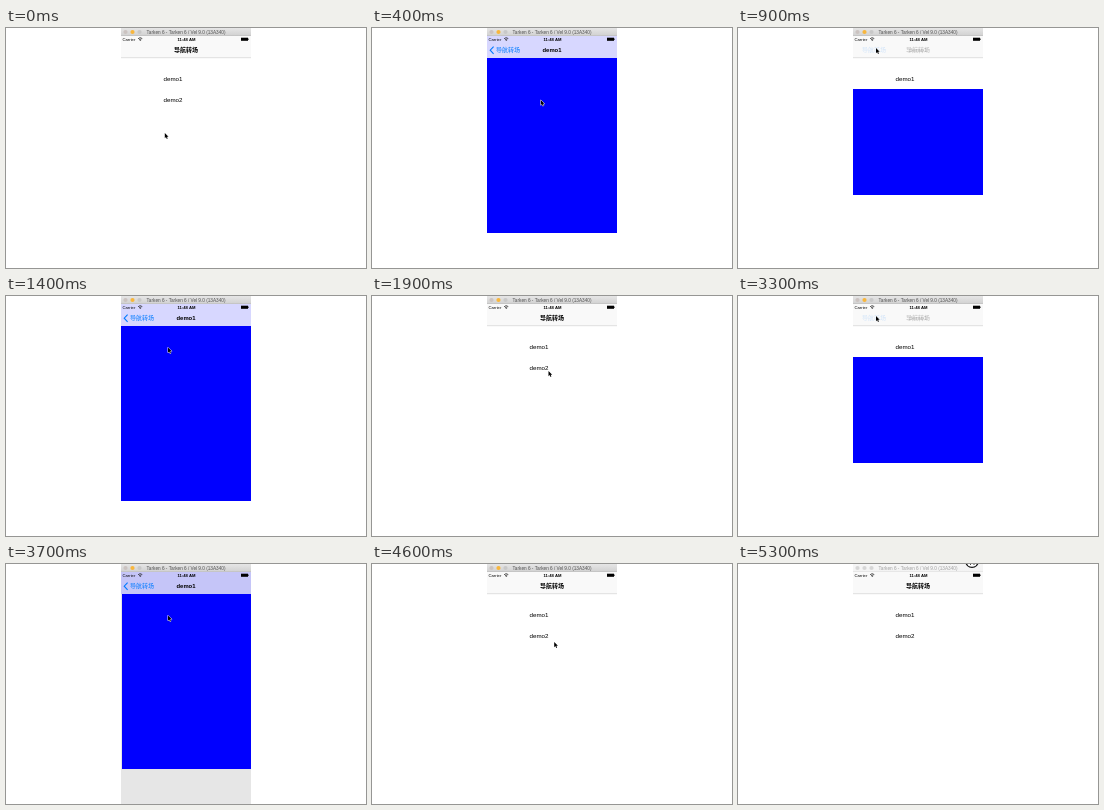
These frames come from a looping animation (360 by 240 pixels, 5.4 s). An HTML page with a canvas:

```html
<!DOCTYPE html>
<html lang="zh">
<head>
<meta charset="utf-8">
<title>导航转场</title>
<style>
  html, body { margin: 0; width: 100%; height: 100%; overflow: hidden; background: #fff; }
  canvas { display: block; }
</style>
</head>
<body>
<canvas id="stage" width="360" height="240"></canvas>
<script>
const ctx = document.getElementById('stage').getContext('2d');
const LOOP = 5400, STEP = 100, CYCLE = 24;
const LEFT = 115, WIDTH = 130, TOP = 8, NAV_BOTTOM = 30, SHEET_BOTTOM = 205, MIDDLE = 123.5;
const SANS = '"Liberation Sans", Arial, sans-serif';
const CJK = '"Noto Sans CJK SC", "Noto Sans CJK", sans-serif';
const HOME = '导航转场';

// Pointer stops: [step, x, y]
const visit = [
  [0, 158.8, 105], [2, 168.8, 72], [5, 168.8, 72], [8, 138, 20], [10, 138, 20],
  [12, 162, 51.5], [14, 162, 51.5], [17, 138, 20], [18, 138, 20],
  [19, 176.5, 75], [22, 182.2, 78], [24, 158.8, 105]
];
const leave = [[46, 182.2, 78], [48, 205, 42], [52, 234, 3]];

function pointerAt(step) {
  const path = step < 46 ? visit : leave;
  const at = step < 46 ? step % CYCLE : step;
  const i = path.findIndex((stop, n) => n && at <= stop[0]);
  const [a, b] = [path[i - 1], path[i]];
  const k = (at - a[0]) / (b[0] - a[0]);
  return [a[1] + (b[1] - a[1]) * k, a[2] + (b[2] - a[2]) * k];
}

// Page pose: pushed in from the right, open, or squashed towards the middle
function poseAt(step) {
  const at = step < 2 * CYCLE ? step % CYCLE : 0;
  if (at === 3 || at === 13) return { open: true, shift: 1 };
  if (at === 9) return { scale: 0.541 };
  if (at === 18) return { scale: 0.705 };
  return { open: (at > 3 && at < 9) || (at > 13 && at < 18), shift: 0 };
}

function rect(x, y, w, h, fill) {
  ctx.fillStyle = fill;
  ctx.fillRect(x, y, w, h);
}

function disc(x, y, r, fill) {
  ctx.fillStyle = fill;
  ctx.beginPath();
  ctx.arc(x, y, r, 0, 7);
  ctx.fill();
}

function line(points, color, width) {
  ctx.strokeStyle = color;
  ctx.lineWidth = width;
  ctx.beginPath();
  points.forEach(p => ctx.lineTo(...p));
  ctx.stroke();
}

function text(str, x, y, font, fill = '#000', align = 'center', alpha = 1) {
  ctx.globalAlpha = alpha;
  ctx.font = font;
  ctx.textAlign = align;
  ctx.fillStyle = fill;
  ctx.fillText(str, x, y);
  ctx.globalAlpha = 1;
}

function drawTitleBar(active) {
  const shade = ctx.createLinearGradient(0, 0, 0, TOP);
  shade.addColorStop(0, active ? '#e6e6e6' : '#f6f6f6');
  shade.addColorStop(1, active ? '#d0d0d0' : '#f3f3f3');
  rect(LEFT, 0, WIDTH, TOP, shade);
  rect(LEFT, TOP - 0.5, WIDTH, 0.5, active ? '#b8b8b8' : '#dadada');
  const lights = active ? ['#cbc3c1', '#f8b63c', '#c8c8c8'] : ['#d6d6d6', '#d6d6d6', '#d6d6d6'];
  lights.forEach((color, i) => disc(119.5 + i * 7, 4, 2.1, color));
  text('Tarken 6 - Tarken 6 / Vel 9.0 (13A340)', 180, 5.7, '4.7px ' + SANS, active ? '#505050' : '#a0a0a0');
}

function drawStatus() {
  text('Carrier', 116.5, 12.9, '4.2px ' + SANS, '#000', 'left');
  text('11:48 AM', 180.5, 12.9, 'bold 4.2px ' + SANS);
  ctx.strokeStyle = '#111';
  ctx.lineWidth = 0.7;
  for (const r of [1.5, 2.9]) {
    ctx.beginPath();
    ctx.arc(134.2, 12.7, r, -2.4, -0.74);
    ctx.stroke();
  }
  disc(134.2, 12.5, 0.5, '#111');
  rect(235, 9.7, 7, 3.1, '#000');
  rect(242.3, 10.6, 0.6, 1.3, '#000');
}

function drawNav({ open, shift, scale }) {
  rect(LEFT, TOP, WIDTH, NAV_BOTTOM - TOP, open ? (shift ? '#c5c5f8' : '#d7d7ff') : '#f9f9f9');
  if (!open) rect(LEFT, NAV_BOTTOM - 0.4, WIDTH, 0.5, '#c4c4c4');
  drawStatus();
  const homeAlpha = open ? 0 : scale ? 0.16 : 1;
  const pageAlpha = open ? 1 : scale ? 0.16 : 0;
  text(HOME, 180, 24.3, 'bold 6px ' + CJK, '#000', 'center', homeAlpha);
  text('demo1', 180, 24.2, 'bold 5.9px ' + SANS, '#000', 'center', pageAlpha);
  text(HOME, 124, 24.3, '6px ' + CJK, '#007aff', 'left', pageAlpha);
  if (open) line([[121.6, 18.6], [118.2, 22.2], [121.6, 25.8]], '#007aff', 1.1);
}

function drawPages({ open, shift, scale }) {
  text('demo1', 167, 53.2, '6.2px ' + SANS);
  text('demo2', 167, 74.2, '6.2px ' + SANS);
  if (open) {
    rect(LEFT, TOP, WIDTH, 240 - TOP, shift ? '#e6e6e6' : '#fff');
    rect(LEFT + shift, TOP, WIDTH - shift, SHEET_BOTTOM - TOP, '#00f');
  } else if (scale) {
    const top = Math.round(MIDDLE - (MIDDLE - TOP) * scale);
    const bottom = Math.floor(MIDDLE + (SHEET_BOTTOM - MIDDLE) * scale);
    rect(LEFT, top, WIDTH, bottom - top, '#00f');
  }
}

function drawPointer(x, y) {
  ctx.save();
  ctx.translate(x, y);
  ctx.beginPath();
  [[0, 0], [0, 5.2], [1.2, 4.1], [2, 6], [2.9, 5.6], [2.1, 3.8], [3.7, 3.7]].forEach(p => ctx.lineTo(...p));
  ctx.closePath();
  ctx.strokeStyle = '#fff';
  ctx.lineWidth = 0.9;
  ctx.stroke();
  ctx.fillStyle = '#000';
  ctx.fill();
  ctx.restore();
}

function drawStopButton() {
  disc(234, -2.8, 6.9, '#111');
  disc(234, -2.8, 5.6, '#fff');
  rect(232, 0, 1, 0.8, '#222');
  rect(235.5, 0, 1, 0.8, '#222');
}

function draw() {
  const step = Math.floor(performance.now() % LOOP / STEP);
  const pose = poseAt(step);
  const stopping = step >= 52;
  rect(0, 0, 360, 240, '#fff');
  drawPages(pose);
  drawNav(pose);
  drawTitleBar(!stopping);
  if (stopping) drawStopButton();
  else drawPointer(...pointerAt(step));
  requestAnimationFrame(draw);
}
draw();
</script>
</body>
</html>
```
